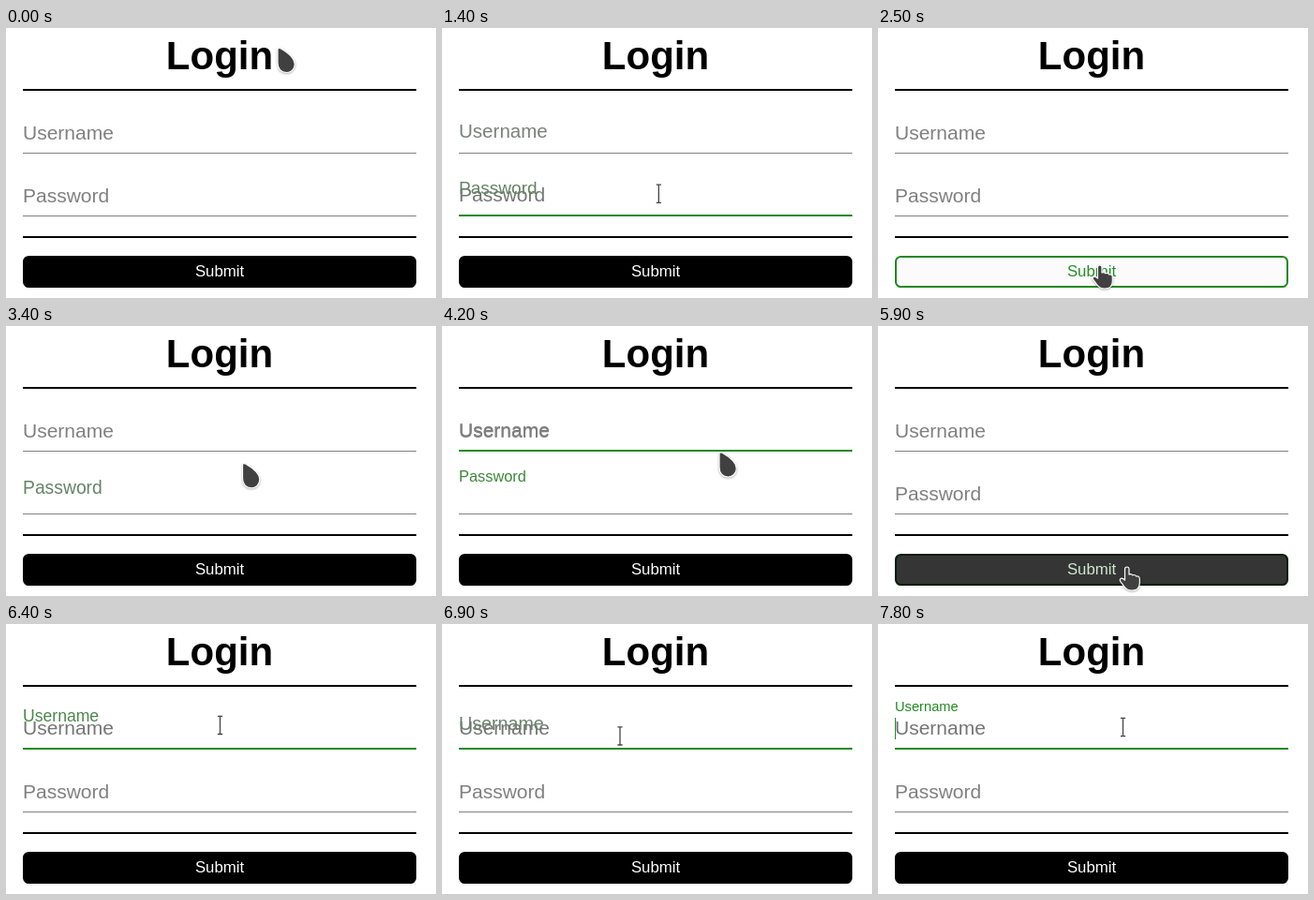
Recreate the animation shown at these times as an HTML page. Size 459 by 288 pixels, loop 8000 ms.

```html
<!DOCTYPE html>
<html lang="en">
<head>
<meta charset="utf-8">
<title>Login form</title>
<style>
  html, body { margin: 0; width: 100%; height: 100%; overflow: hidden; background: #fff; }
  svg { display: block; width: 459px; height: 288px; }
  text { font-family: "Liberation Sans", Arial, sans-serif; font-size: 21px; }
  .title { font-size: 42px; font-weight: bold; }
  .action { font-size: 16.8px; }
  .cursor { fill: #404040; stroke: #fff; stroke-width: 1.2; stroke-linejoin: round;
            filter: drop-shadow(0 1px 1px rgba(0, 0, 0, .3)); }
</style>
</head>
<body>
<svg viewBox="0 0 459 288">
  <text class="title" x="228" y="44" text-anchor="middle">Login</text>
  <path d="M18 66H438M18 223H438" stroke="#000" stroke-width="2"/>
  <g id="fields"></g>
  <rect id="caret" x="18" y="100" width="1" height="23" fill="#228b22"/>
  <rect id="button" x="19" y="244" width="418" height="32" rx="5.3" stroke-width="2"/>
  <text id="submit" class="action" x="228" y="265" text-anchor="middle">Submit</text>
  <g id="pointer">
    <path id="arrow" class="cursor" d="M0 1Q.2 -1.2 2.8 -.4C10.5 4 18.3 10 18.3 16.5C18.3 22 14 25.5 9.5 25.5C3.5 25.5 0 21.5 0 15Z"/>
    <g id="beam">
      <path d="M-2.8 -9.6H2.8M-2.8 9.6H2.8M0 -9.6V9.6" stroke="#fff" stroke-width="3" opacity=".8"/>
      <path d="M-2.6 -9.6H2.6M-2.6 9.6H2.6M0 -9.6V9.6" stroke="#444" stroke-width="1.3"/>
    </g>
    <path id="hand" class="cursor" d="M-3.5 2.5Q-3.5 0 -1.3 0Q1 0 1 2.5V8Q3.5 6.8 5 8.8Q7.5 7.8 8.6 10Q12.3 9.2 12.3 13V17Q12.3 25 4 25Q-1.5 25 -4.5 20.5L-8.3 15.3Q-9.5 13.3 -7.6 12.3Q-6 11.6 -3.5 14Z"/>
  </g>
</svg>
<script>
const LOOP = 8000, STEP = 100, FADE = 300, CLICK = 7800;
const GRAY = [128, 128, 128], GREEN = [34, 139, 34], BLACK = [0, 0, 0], WHITE = [255, 255, 255];
const $ = id => document.getElementById(id);
const mix = (a, b, p) => a + (b - a) * p;
const color = (a, b, p) => `rgb(${a.map((v, i) => Math.round(mix(v, b[i], p)))})`;

function make(tag, attrs, text = '') {
  const el = document.createElementNS('http://www.w3.org/2000/svg', tag);
  for (const k in attrs) el.setAttribute(k, attrs[k]);
  el.textContent = text;
  return $('fields').appendChild(el);
}

// Turning points of the pointer (time, position); it swings between them on a cosine
const turnsX = [[0, 290], [800, 232], [1800, 231], [2400, 238], [3000, 238],
  [4200, 296], [5900, 267], [6900, 190], [7500, 270], [7800, 261.5]];
const turnsY = [[0, 22], [800, 113], [1000, 113], [1520, 186], [1800, 186], [2400, 253], [3000, 253],
  [3600, 112], [4045, 195], [4295, 108], [4770, 223], [5100, 110], [5450, 118], [6000, 269],
  [6420, 107], [6760, 160], [6940, 114], [7180, 248], [7450, 110]];

function swing(turns, t) {
  const next = turns.findIndex(([at]) => at > t);
  if (next < 0) return turns[turns.length - 1][1];
  const [t0, a] = turns[next - 1], [t1, b] = turns[next];
  return mix(a, b, (1 - Math.cos(Math.PI * (t - t0) / (t1 - t0))) / 2);
}

// CSS "ease": cubic-bezier(.25, .1, .25, 1)
function ease(x) {
  if (x <= 0) return 0;
  if (x >= 1) return 1;
  const bezier = (u, a, b) => 3 * u * (1 - u) ** 2 * a + 3 * u * u * (1 - u) * b + u ** 3;
  let lo = 0, hi = 1;
  for (let i = 0; i < 24; i++) {
    const mid = (lo + hi) / 2;
    if (bezier(mid, .25, .25) < x) lo = mid; else hi = mid;
  }
  return bezier(lo, .1, 1);
}

const zone = (top, bottom) => ({ top, bottom, changes: [{ at: 0, from: 0, to: 0 }] });
const inside = (z, y) => y >= z.top && y <= z.bottom;

// Transition progress; a reversed transition is shortened as in CSS
function level(z, t) {
  const { at, from, to } = z.changes.findLast(c => c.at <= t);
  return mix(from, to, ease((t - at) / (FADE * Math.abs(to - from) || 1)));
}

function field(name, base) {
  return {
    ...zone(base - 20, base + 16.5),
    base,
    hint: make('text', { x: 18, y: base - 1, fill: '#757575' }, name),
    label: make('text', { x: 18 }, name),
    line: make('rect', { x: 18, width: 420 })
  };
}

const fields = [field('Username', 119), field('Password', 186)];
const button = zone(243, 277);

// Turn the pointer's path into hover changes once
for (const z of [...fields, button]) {
  for (let t = 0; t < LOOP; t += 2) {
    const to = +inside(z, swing(turnsY, t));
    if (to !== z.changes[z.changes.length - 1].to) z.changes.push({ at: t, from: level(z, t), to });
  }
}

function drawField(f, t, y) {
  const p = level(f, t), hover = inside(f, y);
  f.label.setAttribute('y', Math.floor(f.base - 26 * p));
  f.label.style.fontSize = mix(21, 14.7, p) + 'px';
  f.label.setAttribute('fill', color(GRAY, GREEN, p));
  f.hint.setAttribute('visibility', hover ? 'visible' : 'hidden');
  f.line.setAttribute('y', f.base + (hover ? 13 : 14));
  f.line.setAttribute('height', hover ? 2 : 1);
  f.line.setAttribute('fill', color(GRAY, GREEN, +hover));
}

function draw(t) {
  const x = swing(turnsX, t), y = swing(turnsY, t), p = level(button, t);
  fields.forEach(f => drawField(f, t, y));
  $('button').setAttribute('fill', color(BLACK, WHITE, p));
  $('button').setAttribute('stroke', color(BLACK, GREEN, p));
  $('submit').setAttribute('fill', color(WHITE, GREEN, p));
  $('caret').style.display = t >= CLICK ? '' : 'none';

  const typing = fields.some(f => inside(f, y) && y < f.base + 15);
  const kind = inside(button, y) ? 'hand' : typing ? 'beam' : 'arrow';
  for (const id of ['arrow', 'beam', 'hand']) $(id).style.display = id === kind ? '' : 'none';
  $('pointer').setAttribute('transform', `translate(${x} ${y})`);
}

const start = performance.now();
function tick() {
  const t = (performance.now() - start) % LOOP;
  draw(Math.floor(t / STEP) * STEP);
  requestAnimationFrame(tick);
}
tick();
</script>
</body>
</html>
```
